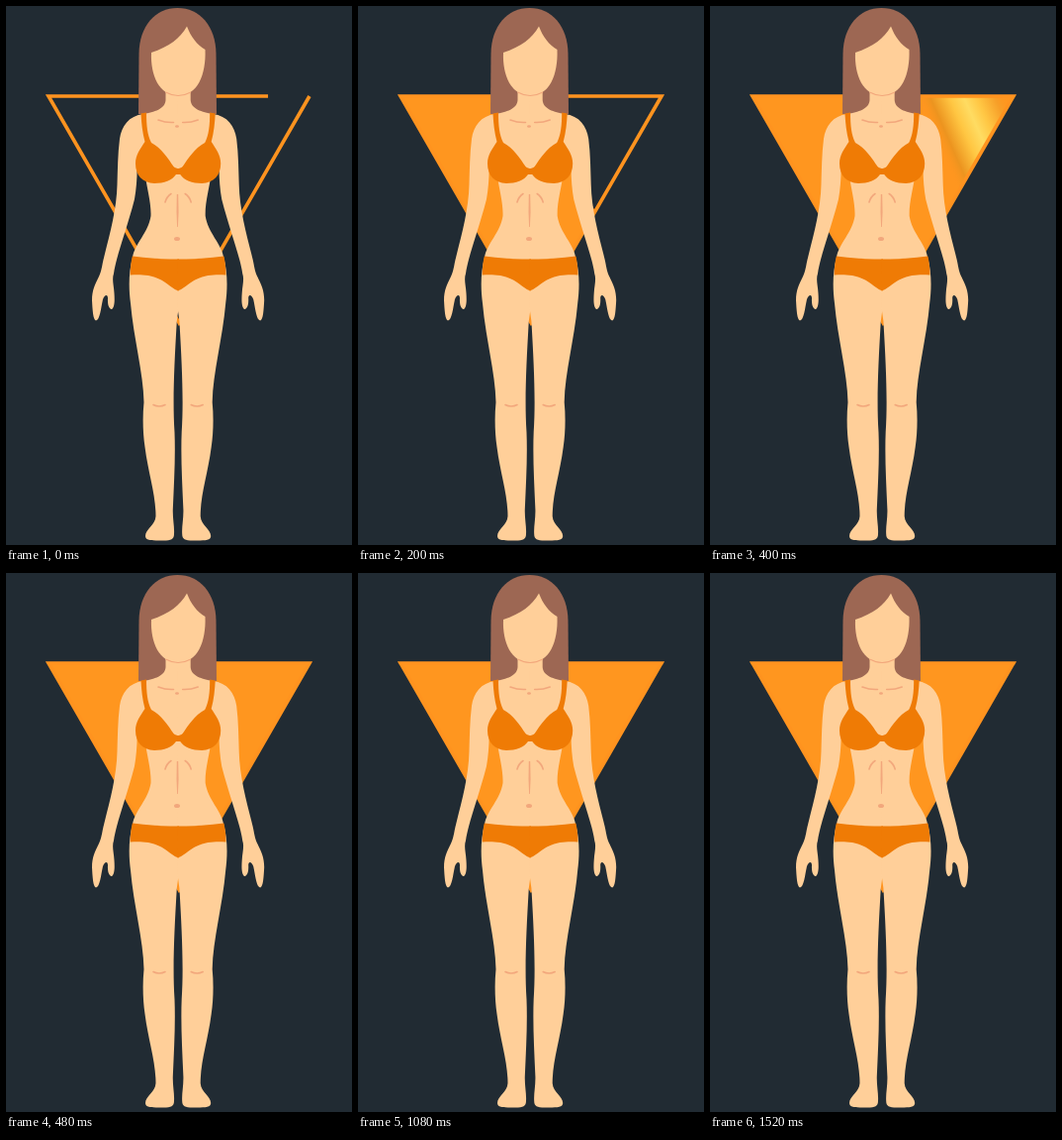
Write an HTML page that moves like this. It is 350 px wide and 544 px high and loops after 1.56 s.

```html
<!DOCTYPE html>
<html lang="en">
<head>
<meta charset="utf-8">
<title>Inverted triangle body shape</title>
<style>
  html, body { margin: 0; width: 100%; height: 100%; overflow: hidden; background: #212b33; }
  svg { display: block; width: 350px; height: 544px; }
</style>
</head>
<body>
<svg viewBox="0 0 350 544">
  <defs>
    <linearGradient id="gloss">
      <stop offset="0" stop-color="#ff961f" stop-opacity="0"/>
      <stop offset=".15" stop-color="#ec941f"/>
      <stop offset=".36" stop-color="#ffc642"/>
      <stop offset=".52" stop-color="#ffdc62"/>
      <stop offset=".66" stop-color="#ffc744"/>
      <stop offset=".86" stop-color="#f79f28"/>
      <stop offset="1" stop-color="#ff961f" stop-opacity="0"/>
    </linearGradient>
    <clipPath id="inside"><path d="M43 91H307L175 319.600Z"/></clipPath>

    <path id="skin" fill="#ffcf99" d="M175 80H161.5V95C161 104 150 107 139 109
      C124 111 117 121 115 134C113 150 113 165 112.5 180C112 205 105 230 100 250
      C97 261 97 267 94 273C90 281 87 287 87 297C87.5 306 88 317 91 317.5
      C95 317 96 305 98 296C100 291 103 291 103 295C102.5 303 105 306 107 306
      C110 304 110 297 109.5 290C109 281 107 276 109 270C111 254 122 226 130 195
      C132 184 133 170 132.5 158L140.5 168C142.500 185 147 198 146.5 212C144 229 130 240 128 254
      C124 268 124 285 126 300C129 335 139 370 139.5 400C138 415 138.500 432 140.500 445
      C144 472 151.500 493 151.500 515C151 524 141 528 141 535C141 539 146 539.5 155 539.5
      C166 540 170 539 170 533C170.500 525 168.500 518 168.800 508C170 480 171.500 455 170.500 430
      C168.5 400 170 365 172.800 318L175 302Z"/>

    <g id="wear" fill="#ef7b05">
      <path d="M136.5 108.5L142 107.5C142 121 143 130 147 138C157 143 164 154 169.5 162
        C171 163.5 173 164 175 164V170H172C168 176 160 179 150 179
        C138 178.5 131 171 131 159C131 150 136 144 140.5 137C138 128 137 118 136.5 108.5Z"/>
      <path d="M127.800 252.500C142 254.500 158 255.500 175 255.500V287.500C167 286 161 275 144 272
        C137 271 132 271 125.8 271.5C125.7 265 126.5 258 127.8 252.5Z"/>
    </g>

    <g id="marks" fill="none" stroke="#f2a77c" stroke-width="1.6" stroke-linecap="round">
      <path d="M154 115Q162 118 169.500 117.500"/>
      <path d="M167 189.500Q162.500 192.500 161 198"/>
      <path d="M149 402.500Q155 405.500 161 402.500"/>
    </g>
  </defs>

  <rect width="350" height="544" fill="#212b33"/>

  <polygon id="fill" fill="#ff961f"/>
  <g clip-path="url(#inside)">
    <rect id="shine" x="-46" width="92" height="240" fill="url(#gloss)"/>
  </g>
  <path id="edge" d="M307 91L175 319.600L43 91Z" fill="none" stroke="#ff931f" stroke-width="3.600"/>

  <path fill="#9d6753" d="M134 109L134.500 48C135 20 151 2 173.500 2C196 2 212 20 212.500 48L213 109Z"/>
  <use href="#skin"/>
  <use href="#skin" transform="matrix(-1 0 0 1 348.200 0)"/>
  <use href="#wear"/>
  <use href="#wear" transform="matrix(-1 0 0 1 348.200 0)"/>
  <use href="#marks"/>
  <use href="#marks" transform="matrix(-1 0 0 1 348.200 0)"/>

  <path fill="#ffcf99" d="M147 47C165 41 176 33 183 20.500C187 31 193 39 201.500 44
    C202.500 69 194 90.500 174.200 90.500C155 90.500 146 70 147 47Z"/>
  <path d="M161.500 87Q174 94 187 87" fill="none" stroke="#f2a77c" stroke-width="1.200"/>
  <g fill="#f2a77c">
    <ellipse cx="173" cy="121.500" rx="2" ry="1.200"/>
    <ellipse cx="173" cy="235" rx="3" ry="2"/>
    <path d="M172.800 190H174.200L174.600 208L173.900 223H173.100L172.500 208Z"/>
  </g>
</svg>
<script>
  const LOOP = 1560, STEP = 40;
  const LEFT = 43, RIGHT = 307, TOP = 91, SIDE = RIGHT - LEFT;
  const ROOT3 = Math.sqrt(3);
  const [fill, shine, edge] = ['fill', 'shine', 'edge'].map(id => document.getElementById(id));
  const clamp = (v, lo, hi) => Math.min(hi, Math.max(lo, v));

  function drawEdge(t) {
    const gap = 42 - t * 1.3;
    edge.setAttribute('stroke-dasharray', gap > 0 ? `${3 * SIDE - gap} ${SIDE}` : 'none');
  }

  // The fill front runs parallel to the left side.
  function drawFill(t) {
    const x = clamp(279 + (t - 280) * 1.325, LEFT, RIGHT);
    const foot = [(x + RIGHT) / 2, TOP + (RIGHT - x) * ROOT3 / 2];
    const tip = [(LEFT + RIGHT) / 2, TOP + SIDE * ROOT3 / 2];
    fill.setAttribute('points', [[LEFT, TOP], [x, TOP], foot, tip].join(' '));
    fill.setAttribute('visibility', x > LEFT ? 'visible' : 'hidden');
  }

  function drawShine(t) {
    const x = 84 + (t - 280) * 1.42;
    shine.setAttribute('transform', `matrix(1 0 .44 1 ${x} ${TOP})`);
    shine.setAttribute('visibility', t >= 240 && t < 480 ? 'visible' : 'hidden');
  }

  function render(ms) {
    const t = Math.floor((ms % LOOP) / STEP) * STEP;
    drawEdge(t);
    drawFill(t);
    drawShine(t);
  }

  let start;
  function tick(now) {
    start ??= now;
    render(now - start);
    requestAnimationFrame(tick);
  }
  render(0);
  requestAnimationFrame(tick);
</script>
</body>
</html>
```
